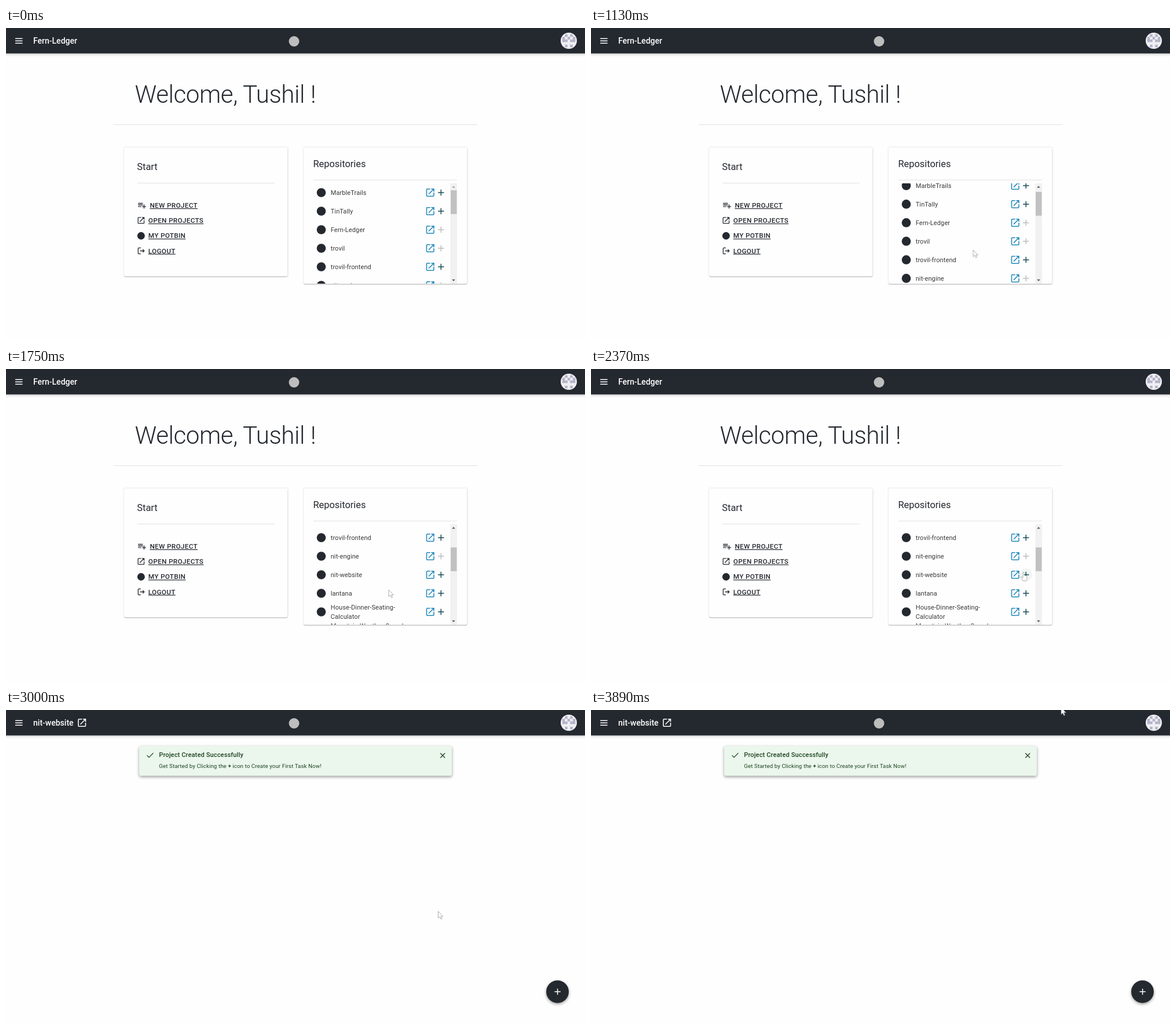
An HTML page for the animation above (4.88 s loop, 1000x540 px).

```html
<!DOCTYPE html>
<html lang="en">
<head>
<meta charset="utf-8">
<title>Project planner</title>
<style>
  html, body { margin: 0; width: 100%; height: 100%; overflow: hidden; background: #fefefe; }
  svg { display: block; width: 100%; height: 100%; font-family: Roboto, sans-serif; fill: #24282f; }
  .line { fill: none; }
  .rule { stroke: #e0e0e0; }
  .bar { filter: drop-shadow(0 .8px 1.2px rgba(0,0,0,.3)) drop-shadow(0 2px 2px rgba(0,0,0,.16)); }
  .card { fill: #fefefe; filter: drop-shadow(0 1px .7px rgba(0,0,0,.25)) drop-shadow(0 .8px 1.6px rgba(0,0,0,.16)); }
  .raised { filter: drop-shadow(0 2px 2.5px rgba(0,0,0,.4)); }
  .name { font-size: 14.06px; font-weight: 500; fill: #fff; }
  .welcome { font-size: 41.96px; font-weight: 300; letter-spacing: -.00833em; }
  .heading { font-size: 16.4px; }
  .action { font-size: 11.72px; font-weight: 500; letter-spacing: .0286em; text-decoration: underline; }
  .repo { font-size: 11px; letter-spacing: .0094em; fill: #393939; }
  #toast { fill: #1e4620; color: #2f5c33; transform-origin: 500px 88px; }
</style>
</head>
<body>
<svg id="stage" viewBox="0 0 1000 540"></svg>
<script>
const LOOP = 4880, PAGE_SWITCH = 2870;
const ticks = [0, 120, 250, 370, 510, 630, 1130, 1250, 1380, 1500, 1750, 1870, 2000, 2120,
  2240, 2370, 2750, 2870, 3000, 3120, 3510, 3640, 3760, 3890];
// Pointer tip: time, x, y
const pointerPath = [[120, 700, 425], [370, 672, 395], [630, 660, 383], [1130, 660, 383],
  [1750, 661, 381], [2370, 746, 350], [2870, 746, 350], [3120, 747, 345], [3510, 761, 275.5],
  [3640, 779, 180], [3760, 798, 75], [3890, 812, -4]];

const repos = ['MarbleTrails', 'TinTally', 'Fern-Ledger', 'trovil', 'trovil-frontend', 'nit-engine',
  'nit-website', 'lantana', 'House-Dinner-Seating-|Calculator', 'Mountain-Weather-Search|Helper'];
const added = [2, 3, 5];

const icons = {
  open: 'M12 4H5.5Q4 4 4 5.5V18.5Q4 20 5.5 20H18.5Q20 20 20 18.5V12M14 4H20V10M20 4L8.5 15.5',
  add: 'M12 5V19M5 12H19',
  playlist: 'M2 7H14M2 11H14M2 15H10M17 10V20M12 15H22',
  logout: 'M11 4H5.5Q4 4 4 5.5V18.5Q4 20 5.5 20H11M9 12H20M16 8L20 12L16 16',
  check: 'M4 12.5L9 17.5L20 6.5',
  close: 'M6 6L18 18M18 6L6 18'
};

const icon = (name, x, y, scale, color = '#24282f') =>
  `<path class="line" d="${icons[name]}" stroke="${color}" stroke-width="2"
    transform="translate(${x} ${y}) scale(${scale}) translate(-12 -12)"/>`;
const text = (cls, x, y, content) => `<text class="${cls}" x="${x}" y="${y}">${content}</text>`;
const dot = (x, y, r, fill = '#24282f', extra = '') =>
  `<circle cx="${x}" cy="${y}" r="${r}" fill="${fill}" ${extra}/>`;
const rect = (x, y, w, h, extra = '') =>
  `<rect x="${x}" y="${y}" width="${w}" height="${h}" ${extra}/>`;
const rule = (x1, x2, y) => `<path class="rule" d="M${x1} ${y}H${x2}"/>`;

function repoRow(label, i) {
  const y = 284 + 32 * i, lines = label.split('|');
  const firstLine = y + 4 - (lines.length - 1) * 8.2;
  return dot(544.5, y, 7.8) +
    lines.map((line, n) => text('repo', 560.7, firstLine + n * 16.4, line)).join('') +
    icon('open', 732.7, y, .78, '#2389bb') +
    icon('add', 751.3, y, .74, added.includes(i) ? '#bdbdbd' : '#174b55');
}

const avatar = ['01010', '10101', '11011', '00000', '01010'].map((row, r) =>
  [...row].map((on, c) => +on ? rect(960.8 + c * 4.5, 10.8 + r * 4.5, 4.5, 4.5, 'fill="#b3b2c9"') : '')
    .join('')).join('');

const homePage = `<g id="home">
  ${text('welcome', 222.5, 129, 'Welcome, Tushil !')}
  ${rule(186, 814, 166.8)}
  ${rect(204, 206, 282.5, 222.5, 'rx="3" class="card"')}
  ${text('heading', 226.3, 245, 'Start')}
  ${rule(227, 464, 267.5)}
  ${icon('playlist', 235, 306, .69)}${text('action', 248.4, 310, 'NEW PROJECT')}
  ${icon('open', 233.3, 332, .65)}${text('action', 245.8, 336.2, 'OPEN PROJECTS')}
  ${dot(233.3, 358.5, 6.5)}${text('action', 245.8, 362.4, 'MY POTBIN')}
  ${icon('logout', 233.5, 384.5, .65)}${text('action', 245.8, 388.6, 'LOGOUT')}
  ${rect(514, 206, 282.5, 235.5, 'rx="3" class="card"')}
  ${text('heading', 530.4, 240, 'Repositories')}
  ${rule(531, 779, 262.2)}
  <g clip-path="url(#listArea)">
    <g id="list">${repos.map(repoRow).join('')}</g>
    ${rect(767.5, 268, 11.5, 173, 'fill="#f1f1f1"')}
    ${rect(768, 280, 10.5, 41, 'id="thumb" fill="#c1c1c1"')}
    <path id="upArrow" d="M770.2 275.6h5.6l-2.8-3z"/>
    <path d="M770.2 433.7h5.6l-2.8 3z" fill="#505050"/>
  </g>
  ${dot(751, 355, 11, '#174b55', 'id="halo"')}
</g>`;

const projectPage = `<g id="project">
  ${dot(952.5, 486, 19.5, '#24282f', 'class="raised"')}
  ${icon('add', 952.6, 486, .74, '#fff')}
  <g id="toast">
    ${rect(230, 62, 540, 51.5, 'rx="3" fill="#ebf6ed" class="raised"')}
    ${icon('check', 249, 78, .68, 'currentColor')}
    <text x="264.3" y="81.3" font-size="11.1" font-weight="500" letter-spacing=".1">Project Created Successfully</text>
    <text x="264.3" y="100.3" font-size="9.7" letter-spacing=".104">Get Started by Clicking the <tspan
      font-weight="700">+</tspan> icon to Create your First Task Now!</text>
    ${icon('close', 754.2, 78.5, .66, '#1e4620')}
  </g>
</g>`;

const stage = document.getElementById('stage');
stage.innerHTML = `
  <clipPath id="listArea">${rect(514, 268, 282, 173)}</clipPath>
  ${homePage}${projectPage}
  ${rect(-5, -5, 1010, 48.75, 'class="bar"')}
  <path class="line" d="M16 18.2H28.5M16 22.2H28.5M16 26.2H28.5" stroke="#fff" stroke-width="1.5"/>
  <g id="homeTitle">${text('name', 47, 27, 'Fern-Ledger')}</g>
  <g id="projectTitle">${text('name', 47, 27, 'nit-website')}${icon('open', 131.2, 22, .78, '#fff')}</g>
  ${dot(497.5, 23, 9, '#bdbdbd')}
  ${dot(972, 22, 14, '#efeff3')}${avatar}
  <g id="pointer" fill="#fff" stroke="#8c8c8c" stroke-width=".7" stroke-linejoin="round">
    <path id="arrow" d="M0 0V11.6L2.8 9.2L4.7 13.5L6.5 12.7L4.7 8.6H8.3Z"/>
    <path id="hand" d="M0 1.2Q1.2-.4 2.2 1.2V6Q3.4 5.2 4 6.4Q5.2 5.7 5.8 7Q7 6.6 7 8V11.5Q7 13.5 5.5 15.5H0Q-1 13-3.6 10Q-4 8-2.2 8.6L0 10.5Z"/>
  </g>`;

const el = id => document.getElementById(id);
const show = (id, on) => el(id).style.display = on ? '' : 'none';
const clamp = v => Math.min(1, Math.max(0, v));
const smooth = v => (v = clamp(v)) * v * (3 - 2 * v);

function pointerAt(t) {
  const next = pointerPath.findIndex(p => p[0] > t);
  if (next < 0) return pointerPath.at(-1).slice(1);
  const b = pointerPath[next], a = pointerPath[next - 1] || b;
  const k = a === b ? 0 : (t - a[0]) / (b[0] - a[0]);
  return [1, 2].map(i => a[i] + (b[i] - a[i]) * k);
}

function draw(time) {
  const t = ticks.findLast(tick => tick <= time);
  const onProject = t >= PAGE_SWITCH;
  for (const id of ['home', 'homeTitle']) show(id, !onProject);
  for (const id of ['project', 'projectTitle']) show(id, onProject);

  const scroll = t < 1130 ? 0 : 121 * smooth((t - 1040) / 460);
  el('list').setAttribute('transform', `translate(0 ${-scroll})`);
  el('thumb').setAttribute('y', 280 + scroll * .23);
  el('upArrow').setAttribute('fill', scroll ? '#505050' : '#a3a3a3');
  el('halo').setAttribute('opacity', t < 2370 ? 0 : t < 2750 ? .05 : .14);

  const grow = clamp((t - 2790) / 144), size = .75 + .25 * grow;
  el('toast').style.transform = `scale(${size}, ${size * size})`;
  el('toast').style.opacity = grow ** 2.5;

  const pointing = t >= 2370 && t < 3000;
  show('pointer', t >= 120);
  show('hand', pointing);
  show('arrow', !pointing);
  el('pointer').setAttribute('transform', `translate(${pointerAt(t)})`);
}

const start = performance.now();
(function frame() {
  draw((performance.now() - start) % LOOP);
  requestAnimationFrame(frame);
})();
</script>
</body>
</html>
```
